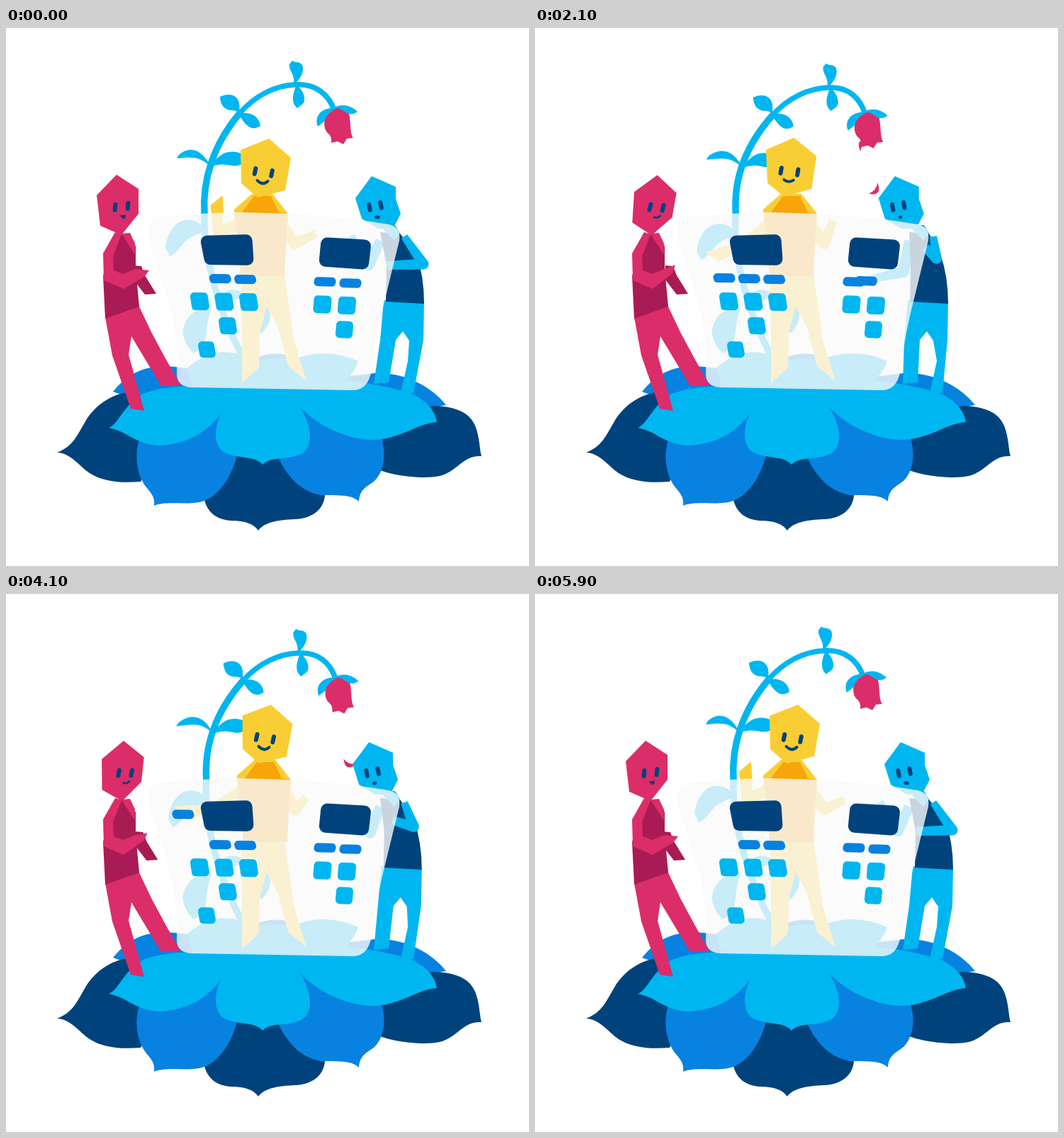
Write an HTML page with a canvas that moves like this. It is 738 px wide and 759 px high and loops after 6 s.

```html
<!DOCTYPE html>
<html lang="en">
<head>
<meta charset="utf-8">
<title>Building together</title>
<style>
html, body { margin: 0; width: 100%; height: 100%; overflow: hidden; background: #fff; }
canvas { display: block; }
</style>
</head>
<body>
<canvas id="stage" width="738" height="759"></canvas>
<script>
const ctx = document.getElementById('stage').getContext('2d');
const CYAN = '#00b6f0', BLUE = '#0882e0', NAVY = '#00437c', PINK = '#db2d69',
      WINE = '#a91b55', YELLOW = '#f9ce34', ORANGE = '#f7a50a';
const LOOP = 6000, STEP = 100;
let time = 0;

const clamp = x => Math.max(0, Math.min(1, x));

// Sine ease from 0 to 1 between two times.
const ease = (from, to) => (1 - Math.cos(Math.PI * clamp((time - from) / (to - from)))) / 2;

// Eases up, holds, and eases back down.
const swell = (rise, top, hold, end) => ease(rise, top) - ease(hold, end);

function shape(color, d) {
  ctx.fillStyle = color;
  ctx.fill(new Path2D(d));
}

function line(color, width, d) {
  ctx.strokeStyle = color;
  ctx.lineWidth = width;
  ctx.lineCap = 'round';
  ctx.stroke(new Path2D(d));
}

function at(x, y, angle, draw) {
  ctx.save();
  ctx.translate(x, y);
  ctx.rotate(angle);
  draw();
  ctx.restore();
}

function faded(alpha, draw) {
  ctx.globalAlpha = clamp(alpha);
  draw();
  ctx.globalAlpha = 1;
}

function rounded(color, r, ...p) {
  const n = p.length;
  ctx.beginPath();
  ctx.moveTo((p[0] + p[n - 2]) / 2, (p[1] + p[n - 1]) / 2);
  for (let i = 0; i < n; i += 2) ctx.arcTo(p[i], p[i + 1], p[(i + 2) % n], p[(i + 3) % n], r);
  ctx.closePath();
  ctx.fillStyle = color;
  ctx.fill();
}

// Tapered limb through [x, y, width] joints.
function limb(color, ...joints) {
  joints.slice(1).forEach(([x2, y2, w2], i) => {
    const [x1, y1, w1] = joints[i], length = Math.hypot(x2 - x1, y2 - y1);
    at(x1, y1, Math.atan2(y2 - y1, x2 - x1), () =>
      shape(color, `M0 ${-w1 / 2}L${length} ${-w2 / 2}V${w2 / 2}L0 ${w1 / 2}Z`));
    if (!i) return;
    ctx.beginPath();
    ctx.arc(x1, y1, w1 / 2, 0, 7);
    ctx.fill();
  });
}

function eyes(x, y, gap, rise, lean) {
  for (const i of [0, 1])
    at(x + gap * i, y - rise * i, lean, () => line(NAVY, 6, 'M0 -4V4'));
}

function lotus() {
  shape(BLUE, 'M151 513C180 478 215 464 303 493L240 525L170 520Z');
  shape(BLUE, 'M470 493L520 487C560 485 600 505 621 532Q607 533 600 542L480 512Z');
  shape(BLUE, 'M340 472Q378 448 420 470L380 490Z');
  shape(CYAN, 'M255 480C290 450 325 452 350 473Q372 462 405 468Q450 449 497 470C490 490 480 495 465 510H265Z');
  shape(NAVY, 'M72 599C95 590 100 575 112 555C124 534 147 517 172 514L230 560L190 640C165 642 138 641 118 628C102 617 92 600 72 599Z');
  shape(NAVY, 'M671 604C667 590 669 562 652 547C640 537 622 533 600 533L500 570L523 622C545 632 590 637 612 632C638 625 645 602 671 604Z');
  shape(NAVY, 'M280 666C284 682 296 694 318 695C338 695 350 700 356 709C364 697 385 694 407 693C436 692 449 676 450 659L395 590H320Z');
  shape(BLUE, 'M304 543L190 575C180 600 184 630 198 648C208 659 210 665 209 674C225 667 250 673 273 669C302 663 320 628 326 603Z');
  shape(BLUE, 'M414 534L528 575C536 592 537 622 520 639C508 648 499 651 498 668C487 657 465 660 445 659C418 655 398 635 384 606Z');
  shape(CYAN, `M145 564C160 558 162 536 193 516Q215 508 243 506L478 497Q535 503 575 517Q604 532 608 556
    C580 558 560 578 522 581C484 582 440 562 414 534C434 563 434 594 414 602C394 610 373 604 362 616
    C350 602 326 609 307 598C293 590 293 562 304 543C284 571 254 588 214 589C180 586 174 570 145 564Z`);
}

function plant() {
  const sway = swell(0, 2900, 2900, LOOP);
  const flutter = (1 - Math.cos(4 * Math.PI * time / LOOP)) / 2;
  const p = (x, y, dx, dy) => `${x + dx * sway} ${y + dy * sway} `;
  const leaf = (dx, dy, d) => at(dx * sway, dy * sway, 0, () => shape(CYAN, d));

  at(flutter * 5, flutter * 8, 0, () =>
    shape(CYAN, 'M280 286C274 266 232 258 225 310L231 322C250 315 244 296 280 288Z'));
  shape(CYAN, 'M290 395C262 390 245 420 251 437Q255 450 265 459C290 448 278 425 290 395Z');
  shape(CYAN, 'M300 378Q318 362 336 375Q318 394 300 378Z');
  shape(CYAN, 'M350 392C382 385 376 418 360 431Q352 420 350 392Z');
  line(CYAN, 9.5, 'M333 462C305 410 278 330 ' + p(280, 262, 4, 0)
    + 'C' + p(277, 215, 4, 0) + p(292, 165, 5, 2) + p(330, 120, 7, 3));
  line(CYAN, 7.5, 'M' + p(330, 120, 7, 3) + 'C' + p(352, 95, 7, 4) + p(380, 81, 7, 5) + p(408, 80, 7, 5)
    + 'C' + p(438, 78, 5, 5) + p(456, 95, 3, 5) + p(463, 116, 3, 5));

  const tipX = 241 - 5 * flutter, tipY = 183 + 4 * flutter - 3 * sway;
  leaf(5, 2, `M288 195C280 176 262 163 ${tipX + 3} ${tipY - 4}L${tipX} ${tipY + 1}C262 182 272 180 288 195Z`);
  leaf(5, 2, 'M289 196C300 176 318 166 345 184Q330 197 318 194Q302 190 289 196Z');
  leaf(7, 1, 'M331 122C328 115 331 111 328 103C324 93 313 92 302 97Q303 114 316 116Q326 115 331 122Z');
  leaf(7, 1, 'M328 121C345 117 357 124 359 138C348 145 340 142 328 121Z');
  leaf(8, 5, 'M406 80C414 74 422 62 418 52C413 46 409 50 404 46L400 51C399 62 408 64 406 80Z');
  leaf(8, 5, 'M410 80C420 88 424 101 419 107L411 113C401 105 405 92 410 80Z');
  at(2 * sway, 7 * sway, 0, () => {
    shape(PINK, `M457 115Q469 109 482 116C488 128 484 147 490 155L481 156L476 164L468 160L459 162
      Q460 153 455 149C447 143 447 126 457 115Z`);
    shape(CYAN, 'M440 139C434 123 447 111 467 113Q452 120 449 132Z');
    shape(CYAN, 'M461 113Q480 103 496 118Q486 125 478 118Q470 112 461 113Z');
  });
}

// A petal drifts down at constant speed, swinging right at `peak`, level at `flat`.
function petal({ start, peak, flat, spin, end }) {
  if (time < start) return;
  const x = 473 + 16 * Math.cos((time - peak) * Math.PI / 2000);
  const y = 160 + (time - start) * .038;
  faded((end - time) / 500, () => at(x, y, spin * (time - flat), () =>
    shape(PINK, 'M-10 -4Q-1 14 10 -4Q0 2 -10 -4Z')));
}

function yellowFigure() {
  const left = swell(0, 1400, 1400, 2900), right = swell(2900, 4600, 4600, LOOP);
  const down = swell(0, 2900, 2900, LOOP), reach = swell(0, 2700, 4600, LOOP);
  const lean = 3.5 * right - 10 * left, body = 5 * right;

  shape(YELLOW, 'M331 346H393L406 440L424 498L398 477L384 422L368 393L358 430L357 479L333 501V425Z');
  const elbow = [299 - 8 * reach, 288 + 25 * down, 15], wrist = [298 - 34 * reach, 263 + 65 * down, 16];
  limb(YELLOW, [332 + body, 276, 18], elbow, wrist);
  at(wrist[0], wrist[1], Math.atan2(wrist[1] - elbow[1], wrist[0] - elbow[0]), () =>
    shape(YELLOW, 'M-1 -8L13 -9L26 8L24 9H-1Z'));
  limb(YELLOW, [390 + body, 280, 18], [408, 304, 16],
    [437 - 20 * down, 290 - 20 * swell(0, 1400, 1400, 5000), 11]);

  at(body, 0, 0, () => {
    shape(YELLOW, 'M347 234H376L398 262V275H322V256Z');
    shape(ORANGE, 'M350 237H374L385 260L397 262L393 350H331L323 262L333 260Z');
  });
  at(360 + lean * .6, 240 - 2 * left, lean * .0048, () => {
    shape(YELLOW, 'M11 -84L42 -57L34 -11L-5 -1L-28 -21L-29 -68Z');
    eyes(-8.5, -38, 23.5, -3, .2);
    const w = 7.5 - 1.5 * left, dip = 8 - 5 * left;
    line(NAVY, 4, `M${2 - w} -25Q2 ${-25 + dip} ${2 + w} -24`);
  });
}

const pull = () => swell(1000, 2900, 2900, 3800);

function blueFigure() {
  const low = swell(0, 1200, 3300, 4500), curl = swell(0, 2300, 2600, LOOP);
  const x = v => v - 7 * swell(0, 2000, 2900, 5200);
  shape(CYAN, `M${x(533)} 384L${x(590)} 386L${x(589)} 440L575 515H557L567 470
    L${x(569)} 441L${x(560)} 428L${x(550)} 440L540 500L519 502L${x(528)} 440Z`);
  limb(CYAN, [528, 300, 14], [512 + 8 * low, 334 + 10 * low, 16],
    [487 + 11 * low - 50 * pull(), 293 + 63 * low, 9]);
  shape(NAVY, `M528 288L556 290L${x(579)} 319Q${x(590)} 350 ${x(590)} 389L${x(536)} 386L${x(537)} 335Z`);
  shape(CYAN, 'M530 278H549L556 290L548 300L534 286Z');
  limb(CYAN, [562, 294, 10], [589 - 23 * curl, 333 - 8 * curl, 15],
    [538 + 13 * curl, 335 - 26 * curl, 12]);
  at(515 - 10 * swell(0, 2900, 2900, 5000), 209, 0, () => {
    shape(CYAN, 'M1 0L35 15V32L42 53L31 74H10L-13 60L-22 31Z');
    eyes(-2, 44, 16, 3, -.2);
    ctx.beginPath();
    ctx.fillStyle = NAVY;
    ctx.ellipse(9, 58, 3.8 - 1.2 * curl, 2.4, .1, 0, 7);
    ctx.fill();
  });
}

function pinkFigure() {
  const s = swell(0, 2300, 2600, LOOP);
  shape(PINK, 'M140 408L187 391L206 431L226 468L247 505H219L177 435L173 461L195 540L176 537L150 462Z');
  shape(WINE, 'M154 290H174L183 308V340L188 393L140 410L137 350Z');
  at(4 * s, 0, 0, () => shape(WINE, 'M180 335L191 336L196 349L212 375L196 376L179 354Z'));
  shape(PINK, `M154 288L163 291L151 322L152 342L165 347L183 340L${202 - 4 * s} ${342 - 8 * s}
    L${195 - s} ${351 - 5 * s}L166 368L138 356L137 318Z`);
  shape(PINK, 'M163 290L175 289L182 304V320Z');
  at(160 + 2 * s, 290, s * .18, () => {
    shape(PINK, 'M-4 -83L27 -63V-28L3 2L-27 -11L-32 -54Z');
    eyes(-6, -37, 18, 2, .1);
    if (s < .45) shape(NAVY, 'M0 -26Q5 -25 9 -27Q9 -20 5 -21Z');
    else line(NAVY, 2.8, 'M2 -24Q6 -22 10 -27');
  });
}

function tile(x, y, w, h, skew, color) {
  const drop = skew < 0 ? 1 : .3;
  rounded(color, 5.5, x, y, x + w, y + drop, x + w + skew, y + h + drop, x + skew, y + h);
}

const pill = (x, y, skew) => tile(x, y, 31, 13, skew, BLUE);

function tileGrid(rows, x, y, shift, drop) {
  rows.forEach((row, r) => [...row].forEach((cell, c) => {
    if (cell === '#') tile(x + 34.5 * c + shift * r, y + 34.5 * r + drop * c, 25 - r, 25 - r, shift * .7, CYAN);
  }));
}

function panel() {
  shape('rgba(250,250,250,.8)', `M220 266Q275 261 332 260L400 262Q475 266 540 277Q558 281 555 300
    L530 402Q521 440 516 482Q511 512 488 511L262 507Q240 506 241 486Q244 434 226 375L201 297Q194 271 220 266Z`);
  rounded(NAVY, 9, 273, 293, 347, 291, 350, 335, 281, 334);
  rounded(NAVY, 9, 445, 295, 516, 299, 511, 341, 441, 336);
  tileGrid(['###', '.#.', '#..'], 259, 373, 5.5, .5);
  tileGrid(['##', '.#'], 435, 377, -3, 1.5);

  const lift = ease(2900, 4300);
  for (const i of [1, 2]) pill(249.5 + 35.3 * i, 346 + i, 4);
  faded(ease(400, 900) * clamp((5100 - time) / 600), () => pill(249.5 - 18 * lift, 346 - 44 * lift, 4));
  pill(436, 351, -3);
  pill(472 - 30 * pull(), 353 - 5 * pull(), -3);
}

function draw() {
  time = Math.floor(performance.now() % LOOP / STEP) * STEP;
  ctx.fillStyle = '#fff';
  ctx.fillRect(0, 0, 738, 759);
  lotus();
  petal({ start: 300, peak: 1400, flat: 3600, spin: .0006, end: 4300 });
  petal({ start: 2000, peak: 4600, flat: 4500, spin: -.0009, end: 5200 });
  plant();
  yellowFigure();
  blueFigure();
  panel();
  pinkFigure();
  requestAnimationFrame(draw);
}
draw();
</script>
</body>
</html>
```
